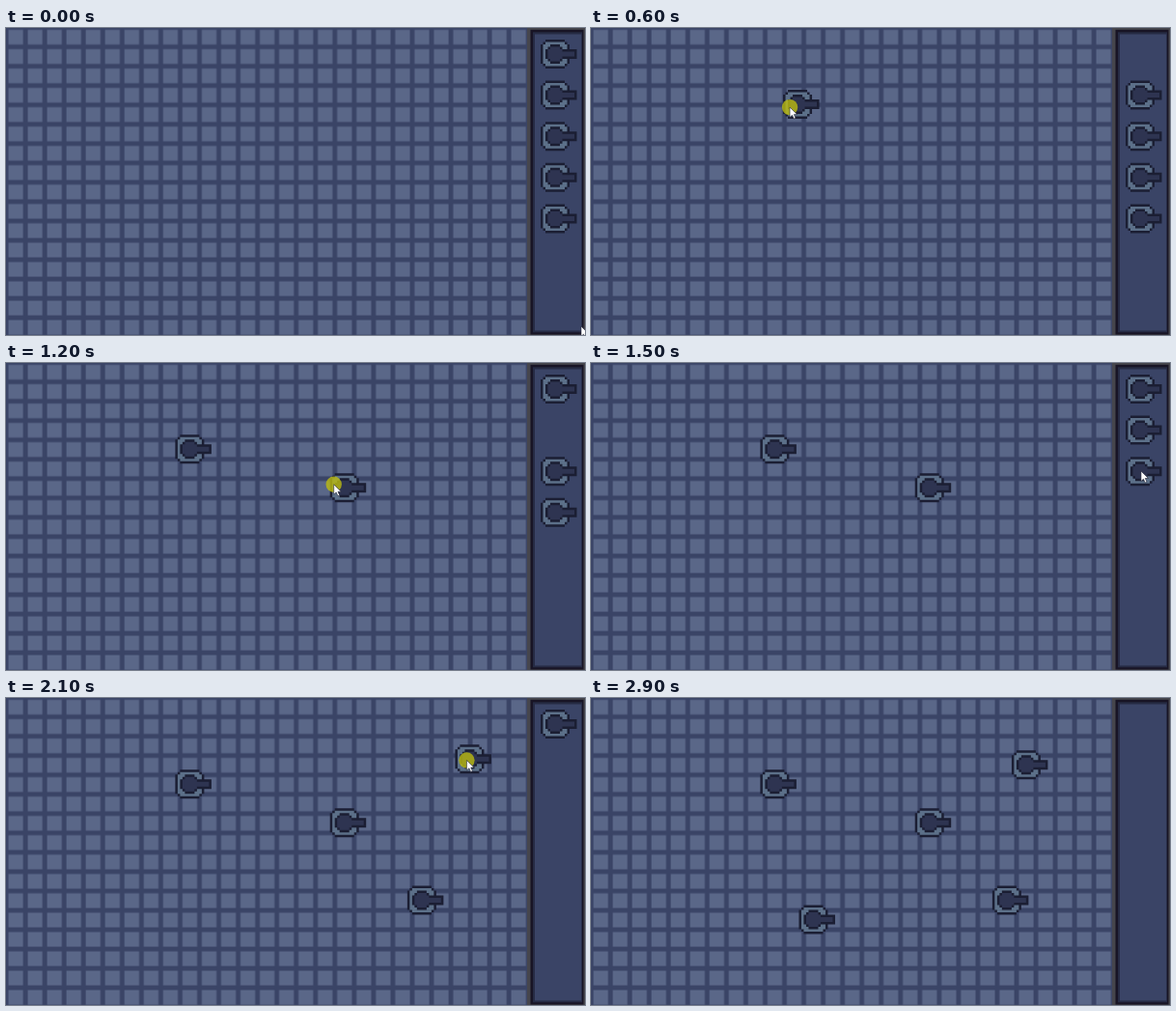
Write an HTML page that moves like this. It is 600 by 318 pixels and loops after 3100 ms.

```html
<!DOCTYPE html>
<html lang="en">
<head>
<meta charset="utf-8">
<title>Turret placement</title>
<style>
html, body { margin: 0; width: 100%; height: 100%; overflow: hidden; background: #3a4466; }
svg { display: block; width: 600px; height: 318px; }
</style>
</head>
<body>
<svg viewBox="0 0 600 318">
  <defs>
    <pattern id="tile" width="20.04" height="20.04" y="-0.6" patternUnits="userSpaceOnUse">
      <rect width="20.04" height="20.04" fill="#3a4466"/>
      <rect x="2.5" y="2.5" width="15.2" height="15.2" fill="#5a6788"/>
    </pattern>
    <!-- one unit is one sprite pixel -->
    <g id="turret" transform="scale(2.5)">
      <path fill="#1b1e33" d="M-4-6H4V-5H5V-4H6V4H5V5H4V6H-4V5H-5V4H-6V-4H-5V-5H-4Z"/>
      <path fill="#5c7089" d="M-4-5H4V-4H5V4H4V5H-4V4H-5V-4H-4Z"/>
      <path fill="#1b1e33" d="M-2-4H2V-3H3V-2H9V2H3V3H2V4H-2V3H-3V2H-4V-2H-3V-3H-2Z"/>
      <path fill="#2e3451" d="M-2-3H2V-2H3V-1H8V1H3V2H2V3H-2V2H-3V-2H-2Z"/>
    </g>
  </defs>
  <rect width="541" height="318" fill="url(#tile)"/>
  <rect x="540" width="60" height="318" fill="#46464d"/>
  <rect x="543.5" y="1.8" width="55" height="315.7" fill="#181425"/>
  <rect x="546" y="4.3" width="51" height="311" fill="#262b44"/>
  <rect x="548" y="6.5" width="48.2" height="306.9" fill="#3a4466"/>
  <g id="slots"></g>
  <g id="placed"></g>
  <use id="held" href="#turret"/>
  <g id="mouse">
    <circle id="press" r="8.2" fill="#bcbc10" opacity=".8"/>
    <path d="M0 0V10.4L2.5 8.2L4.2 12L6 11.2L4.3 7.5H7.6Z" fill="#fff" stroke="#23263a" stroke-width=".6"/>
  </g>
</svg>
<script>
const STEP = 100, LOOP = 3100, CELL = 20.04;
const $ = id => document.getElementById(id);
const slotPos = i => [569, 27 + 42.6 * i];
const cellPos = cell => [(cell[0] + .5) * CELL, (cell[1] + .5) * CELL - .9];
const add = (a, b) => [a[0] + b[0], a[1] + b[1]];
const sub = (a, b) => [a[0] - b[0], a[1] - b[1]];
const easeOut = u => 1 - (1 - u) ** 2;

// slot, step and point of the pick, step and cell of the drop, later stops
const drags = [
  { slot: 0, from: 3, pick: [561, 30], to: 7, cell: [9, 4] },
  { slot: 1, from: 10, pick: [558, 66], to: 12, cell: [17, 6] },
  { slot: 2, from: 15, pick: [570, 112], to: 17, cell: [21, 10],
    then: [{ at: 18, p: [447, 200] }, { at: 19, p: [591, 301] }] },
  { slot: 1, from: 20, pick: [566, 71], to: 22, cell: [22, 3] },
  { slot: 0, from: 24, pick: [565, 31], to: 27, cell: [11, 11],
    then: [{ at: 28, p: [240, 306] }, { at: 29, p: [240, 345] }] }
];

// the pointer's stops; bow is the height of the arc that leads to a stop
const stops = [{ at: 0, p: [596, 309] }];
for (const d of drags) {
  d.grab = sub(slotPos(d.slot), d.pick);
  stops.push(
    { at: d.from, p: d.pick, bow: .25 },
    { at: d.to, p: sub(cellPos(d.cell), d.grab), bow: .07 },
    ...(d.then || []));
}

function pointer(step) {
  const i = stops.findIndex(s => s.at >= step);
  if (i < 0) return stops[stops.length - 1].p;
  if (i === 0) return stops[0].p;
  const a = stops[i - 1], b = stops[i];
  const u = easeOut((step - a.at) / (b.at - a.at));
  const [dx, dy] = sub(b.p, a.p);
  const lift = (b.bow || 0) * Math.hypot(dx, dy) * 4 * u * (1 - u);
  return add(a.p, [dx * u, dy * u - lift]);
}

function move(el, [x, y]) {
  el.setAttribute("transform", `translate(${x} ${y})`);
}

function show(el, on) {
  el.style.display = on ? "" : "none";
}

function addTurret(parent, pos) {
  const el = document.createElementNS("http://www.w3.org/2000/svg", "use");
  el.setAttribute("href", "#turret");
  move(el, pos);
  return $(parent).appendChild(el);
}

const slots = drags.map((d, i) => addTurret("slots", slotPos(i)));
const placed = drags.map(d => addTurret("placed", cellPos(d.cell)));

function draw(time) {
  const step = Math.floor(time % LOOP / STEP);
  const active = drags.find(d => step > d.from && step <= d.to);
  const left = drags.filter(d => step <= d.to).length;
  const pos = pointer(step);

  slots.forEach((el, i) => show(el, i < left && !(active && active.slot === i)));
  placed.forEach((el, i) => show(el, step > drags[i].to));
  show($("held"), active);
  show($("press"), active);
  move($("mouse"), pos);
  if (active) move($("held"), add(pos, active.grab));
}

const start = performance.now();
function tick() {
  draw(performance.now() - start);
  requestAnimationFrame(tick);
}
tick();
</script>
</body>
</html>
```
